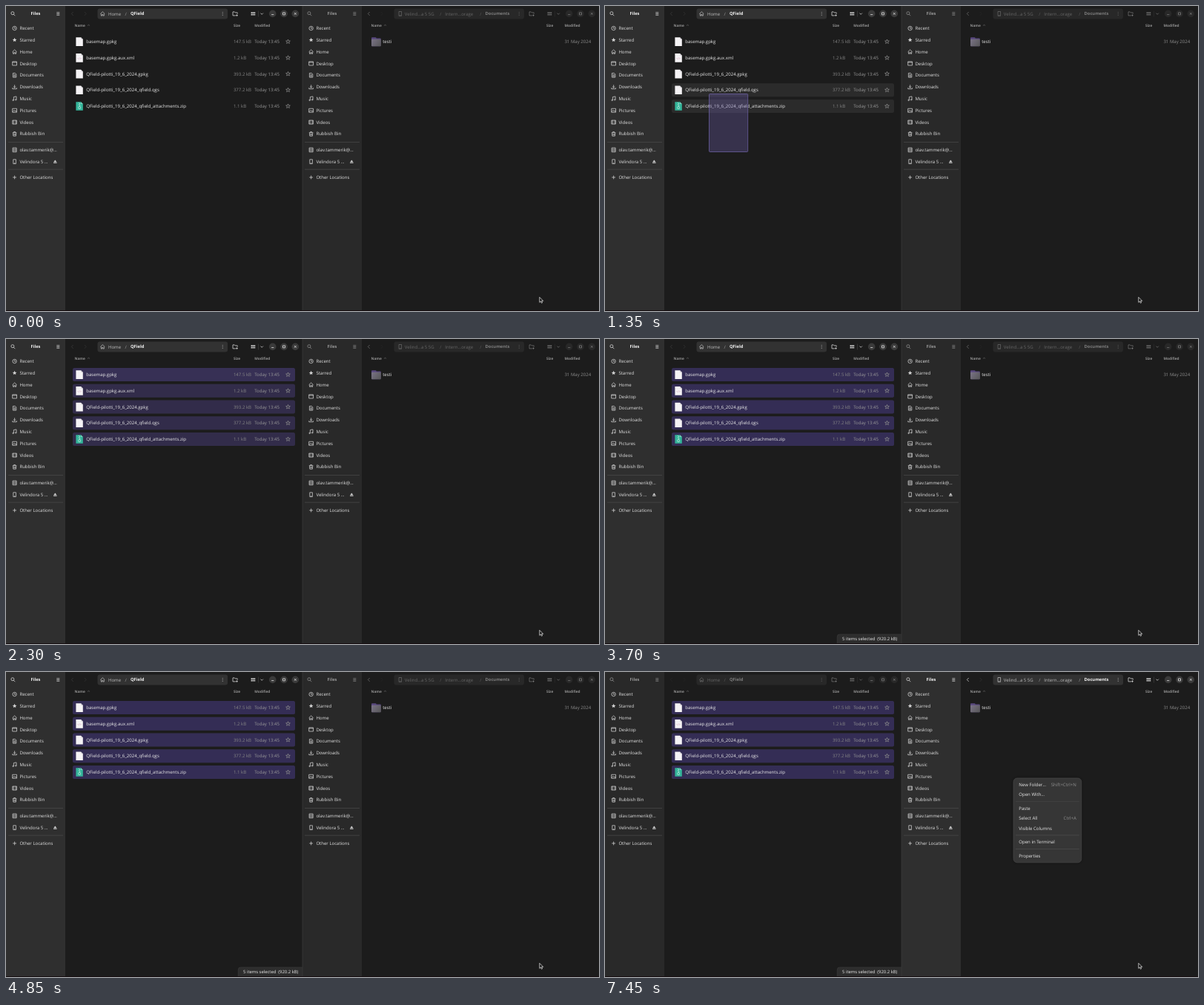
These frames come from a looping animation (800 by 411 pixels, 8 s). An HTML page with a canvas:

```html
<!DOCTYPE html>
<html lang="en">
<head>
<meta charset="utf-8">
<title>File manager: copy files to phone</title>
<style>
html, body { margin: 0; width: 100%; height: 100%; overflow: hidden; background: #1c1c1c; }
canvas { display: block; width: 800px; height: 411px; }
</style>
</head>
<body>
<canvas id="stage"></canvas>
<script>
const LOOP = 8000, STEP = 50, W = 800, H = 411;
const canvas = document.getElementById('stage');
const ctx = canvas.getContext('2d');
const dpr = window.devicePixelRatio || 1;
canvas.width = W * dpr;
canvas.height = H * dpr;

const ICONS = {
  search: 'M1.4-.6a2 2 0 1 1-4 0a2 2 0 1 1 4 0M.8.9L2.8 2.9',
  menu: 'M-2-1.8H2M-2 0H2M-2 1.8H2',
  clock: 'M2.7 0a2.7 2.7 0 1 1-5.4 0a2.7 2.7 0 1 1 5.4 0M0-1.7V.2H1.5',
  star: 'M0-3L.8-.95L2.9-.9L1.25.4L1.8 2.5L0 1.3L-1.8 2.5L-1.25.4L-2.9-.9L-.8-.95Z',
  home: 'M-3 .2L0-2.7L3 .2M-2 0V2.7H-.6V1H.6V2.7H2V0',
  desktop: 'M-2.9-2.5H2.9V2.5H-2.9ZM-2.9-1.5H2.9',
  document: 'M-2.2-2.8H.8L2.2-1.4V2.8H-2.2ZM-1.1-.6H1.1M-1.1.6H1.1M-1.1 1.7H1.1',
  download: 'M0-2.8V1M-1.7-.6L0 1.1L1.7-.6M-2.8 1V2.6H2.8V1',
  music: 'M-1.2 2V-2.4L2.4-3V1.3M-1.2 2a.8.7 0 1 1-1.6 0a.8.7 0 1 1 1.6 0M2.4 1.4a.8.7 0 1 1-1.6 0a.8.7 0 1 1 1.6 0',
  picture: 'M-2.9-2.5H2.9V2.5H-2.9ZM-2.6 1.9L-.8-.3L.4 1L1.4.2L2.7 1.8',
  video: 'M-2.8-2.5H2.8V2.5H-2.8ZM-1.5-2.5V2.5M1.5-2.5V2.5',
  bin: 'M-2.8-1.7H2.8M-1-1.8V-2.8H1V-1.8M-2.1-1.2L-1.8 2.8H1.8L2.1-1.2M-.6-.4V1.8M.6-.4V1.8',
  disk: 'M-2.5-2.8H2.5V2.8H-2.5ZM-2.5-.9H2.5M-2.5 1H2.5',
  phone: 'M-1.8-2.9H1.8V2.9H-1.8ZM-.6 2H.6',
  plus: 'M-2.4 0H2.4M0-2.4V2.4',
  eject: 'M0-2.2L2.3.7H-2.3ZM-2.3 1.5H2.3V2.2H-2.3Z',
  back: 'M1.2-2.4L-1.2 0L1.2 2.4',
  forward: 'M-1.2-2.4L1.2 0L-1.2 2.4',
  down: 'M-1.7-.8L0 .9L1.7-.8',
  folder: 'M-3.2 2.5V-2.5H-.9L0-1.5H3V.2M-3.2 2.5H.8M2.3.9V3.5M1 2.2H3.6',
  grid: 'M-2.6-2.2H-1V-.5H-2.6ZM-.6-2.2H1V-.5H-.6ZM1.4-2.2H3V-.5H1.4ZM-2.6.4H-1V2.1H-2.6ZM-.6.4H1V2.1H-.6ZM1.4.4H3V2.1H1.4Z',
  minimise: 'M-1.6 1.2H1.6',
  maximise: 'M-1.5-1.5H1.5V1.5H-1.5Z',
  close: 'M-1.4-1.4L1.4 1.4M1.4-1.4L-1.4 1.4',
  dots: 'M-.4-2.4H.4V-1.6H-.4ZM-.4-.4H.4V.4H-.4ZM-.4 1.6H.4V2.4H-.4Z',
  sort: 'M-1.5.5L0-.7L1.5.5',
  pointer: 'M0 0V7L1.6 5.5L2.7 7.9L3.8 7.3L2.8 5H4.9Z'
};
for (const name in ICONS) ICONS[name] = new Path2D(ICONS[name]);

const PLACES = [
  ['clock', 'Recent'], ['star', 'Starred'], ['home', 'Home'], ['desktop', 'Desktop'],
  ['document', 'Documents'], ['download', 'Downloads'], ['music', 'Music'],
  ['picture', 'Pictures'], ['video', 'Videos'], ['bin', 'Rubbish Bin']
];
const FILES = [
  ['basemap.gpkg', '147.5 kB'],
  ['basemap.gpkg.aux.xml', '1.2 kB', 'xml'],
  ['QField-pilotti_19_6_2024.gpkg', '393.2 kB'],
  ['QField-pilotti_19_6_2024_qfield.qgs', '377.2 kB'],
  ['QField-pilotti_19_6_2024_qfield_attachments.zip', '1.1 kB', 'zip']
];
// Each menu row: label, shortcut; null is a separator.
const FILE_MENU = [
  ['New Folder with Selection (5 Items)'], null,
  ['Open', 'Return'], ['Open With…'], null,
  ['Cut', 'Ctrl+X'], ['Copy', 'Ctrl+C'], ['Move to…'], ['Copy to…'], null,
  ['Rename…', 'F2'], ['Compress…'], ['E-mail…'], ['Move to the Rubbish Bin', 'Delete'], null,
  ['Properties', 'Alt+Return']
];
const FOLDER_MENU = [
  ['New Folder…', 'Shift+Ctrl+N'], ['Open With…'], null,
  ['Paste'], ['Select All', 'Ctrl+A'], ['Visible Columns'], null,
  ['Open in Terminal'], null, ['Properties']
];

const clamp = v => Math.max(0, Math.min(1, v));
const ramp = (t, a, b) => clamp((t - a) / (b - a));
const easeOut = p => 1 - (1 - p) ** 2;
const lerp = (a, b, p) => a + (b - a) * p;
const grey = v => `rgb(${v},${v},${v})`;
const rowY = i => 48 + i * 21.74;

function rect(x, y, w, h, fill, r = 0, stroke) {
  ctx.beginPath();
  ctx.roundRect(x, y, w, h, r);
  if (fill) { ctx.fillStyle = fill; ctx.fill(); }
  if (stroke) { ctx.strokeStyle = stroke; ctx.lineWidth = 0.7; ctx.stroke(); }
}

function text(str, x, y, color = '#e8e8e8', { size = 6.05, bold = false, align = 'left' } = {}) {
  ctx.font = `${bold ? 'bold ' : ''}${size}px "Open Sans", "Noto Sans", sans-serif`;
  ctx.textAlign = align;
  ctx.fillStyle = color;
  ctx.fillText(str, x, y + size * 0.35);
}

function icon(name, x, y, color = '#dedede', filled = false) {
  ctx.save();
  ctx.translate(x, y);
  ctx.lineWidth = 0.75;
  ctx.strokeStyle = ctx.fillStyle = color;
  filled ? ctx.fill(ICONS[name]) : ctx.stroke(ICONS[name]);
  ctx.restore();
}

function withAlpha(a, draw) {
  if (a <= 0) return;
  ctx.save();
  ctx.globalAlpha *= a;
  draw();
  ctx.restore();
}

function sidebar(x, focus) {
  rect(x, 0, 80, H, grey(Math.round(lerp(41, 47, focus))));
  withAlpha(lerp(0.55, 1, focus), () => {
    icon('search', x + 9.5, 10.3);
    text('Files', x + 40, 10.3, '#f2f2f2', { size: 5.7, bold: true, align: 'center' });
    icon('menu', x + 70.3, 10.5);
  });
  const entry = (name, label, y) => {
    icon(name, x + 11.6, y, '#d4d4d4', name === 'star');
    text(label, x + 18.4, y, '#e2e2e2');
  };
  PLACES.forEach(([name, label], i) => entry(name, label, 30 + i * 15.82));
  rect(x + 3, 183, 74, 0.7, '#484848');
  entry('disk', 'olav.tammerik@…', 193.9);
  entry('phone', 'Velindora 5 …', 209.7);
  icon('eject', x + 66.3, 209.7, '#d4d4d4', true);
  rect(x + 3, 219.8, 74, 0.7, '#484848');
  entry('plus', 'Other Locations', 230.9);
}

function header(x, focus, canGoBack, drawPath) {
  const y = 10.4;
  rect(x + 123.5, 3.4, 175.5, 14, grey(Math.round(lerp(40, 50, focus))), 3);
  withAlpha(lerp(0.42, 1, focus), () => {
    icon('back', x + 89.5, y, canGoBack ? '#d8d8d8' : '#3c3c3c');
    icon('forward', x + 107, y, '#343434');
    drawPath(y);
    icon('dots', x + 292.2, y, '#d8d8d8', true);
    icon('folder', x + 309.2, y);
    icon('grid', x + 333.2, y, '#d8d8d8', true);
    rect(x + 340.2, y - 4, 0.6, 8, '#454545');
    icon('down', x + 345.2, y);
    ['minimise', 'maximise', 'close'].forEach((name, i) => {
      const cx = x + 359.7 + i * 15.3;
      rect(cx - 4.8, y - 4.8, 9.6, 9.6, '#3a3a3a', 4.8);
      icon(name, cx, y, '#eee');
    });
  });
}

function columns(nameX, sizeX, dateX) {
  const caption = { size: 4.8, bold: true };
  text('Name', nameX, 26, '#929292', caption);
  icon('sort', nameX + 19, 26, '#666');
  text('Size', sizeX, 26, '#929292', caption);
  text('Modified', dateX, 26, '#929292', caption);
}

function localPath(y) {
  icon('home', 130.3, y, '#bdbdbd');
  text('Home', 138, y, '#bdbdbd');
  text('/', 160.6, y, '#a0a0a0');
  text('QField', 168, y, '#f4f4f4', { size: 5.8, bold: true });
}

function phonePath(y) {
  icon('phone', 531.8, y, '#bdbdbd');
  text('Velind…a 5 5G', 537.8, y, '#bdbdbd');
  text('/', 585.2, y, '#a0a0a0');
  text('Intern…orage', 592.3, y, '#bdbdbd');
  text('/', 639.2, y, '#a0a0a0');
  text('Documents', 646.5, y, '#f4f4f4', { size: 5.8, bold: true });
}

function fileIcon(kind, y) {
  const x = 94.4, top = y - 5.8, w = 9.4, h = 11.7, fold = 2.8;
  ctx.beginPath();
  ctx.moveTo(x, top);
  ctx.lineTo(x + w - fold, top);
  ctx.lineTo(x + w, top + fold);
  ctx.lineTo(x + w, top + h);
  ctx.lineTo(x, top + h);
  ctx.closePath();
  ctx.fillStyle = kind === 'zip' ? '#34b59a' : '#f5f3f5';
  ctx.fill();
  ctx.beginPath();
  ctx.moveTo(x + w - fold, top);
  ctx.lineTo(x + w, top + fold);
  ctx.lineTo(x + w - fold, top + fold);
  ctx.fillStyle = kind === 'zip' ? '#7ed0bd' : '#d8d4d9';
  ctx.fill();
  if (kind === 'xml') text('</>', x + 4.7, y + 1, '#c58cae', { size: 3.8, align: 'center' });
  if (kind === 'zip') {
    for (let i = 0; i < 4; i++) rect(x + 3.6 + (i % 2) * 1.1, top + 1 + i * 1.2, 1.1, 0.9, '#d9f3ec');
    rect(x + 3.4, y + 0.6, 2.6, 3, null, 0.8, '#d9f3ec');
  }
}

// Top-left corner of the selection band; its other corner is fixed.
function bandCorner(t) {
  const path = [[950, 190, 193], [1350, 140.5, 118.5], [1750, 113, 62], [1800, 110, 56], [2050, 103, 44]];
  let i = 0;
  while (i < path.length - 2 && t > path[i + 1][0]) i++;
  const [ta, xa, ya] = path[i], [tb, xb, yb] = path[i + 1];
  const p = ramp(t, ta, tb);
  return [lerp(xa, xb, p), lerp(ya, yb, p)];
}

function files(t) {
  const [bx, by] = bandCorner(t);
  const banding = t >= 950 && t < 2200;
  const selected = easeOut(ramp(t, 2200, 2400));
  const hover = t < 2200 ? 0 : 1 - ramp(t, 2400, 2500);
  FILES.forEach(([name, size, kind], i) => {
    const y = rowY(i), box = [90, y - 8.9, 300, 17.9];
    if (banding && by < y + 9 || t >= 2200) rect(...box, '#2b2b2b', 2.5);
    withAlpha(selected, () => rect(...box, '#342d55', 2.5));
    if (i === 0) withAlpha(hover, () => rect(...box, 'rgba(90,74,165,.12)', 2.5));
    fileIcon(kind, y);
    text(name, 108.2, y);
    text(size, 306.9, y, '#858585');
    text('Today 13:45', 335.2, y, '#999');
    icon('star', 380.5, y, '#8c8c8c');
  });
  if (banding) rect(bx, by, 192.7 - bx, 196.5 - by, 'rgba(112,98,176,.32)', 1, '#7468b0');
}

function phoneFolder() {
  const y = 48.2;
  rect(493, y - 6, 6.5, 4, '#59487f', 1);
  const g = ctx.createLinearGradient(493, y - 4, 506, y + 6);
  g.addColorStop(0, '#7b7488');
  g.addColorStop(1, '#565656');
  rect(493, y - 4.6, 12.8, 10.6, '#59487f', 1);
  rect(493, y - 3.4, 12.8, 9.4, g, 1);
  text('testi', 508.2, y);
  text('31 May 2024', 753.4, y, '#8c8c8c');
}

function statusBar(alpha) {
  withAlpha(alpha, () => {
    rect(313.3, 398, 90, 16, '#2d2d2d', 3, '#3b3b3b');
    text('5 items selected  (920.2 kB)', 320, 404.4, '#ececec', { size: 5.9 });
  });
}

function menu(items, x, y, w, h, alpha, active) {
  withAlpha(alpha, () => {
    ctx.save();
    ctx.shadowColor = 'rgba(0,0,0,.45)';
    ctx.shadowBlur = 4;
    rect(x, y, w, h, '#363636', 5);
    ctx.restore();
    rect(x, y, w, h, null, 5, '#484848');
    let cy = y + 8.8;
    items.forEach((item, i) => {
      if (!item) {
        rect(x + 3, cy - 4.2, w - 6, 0.6, '#4b4b4b');
        cy += 5.45;
        return;
      }
      if (i === active) rect(x + 3, cy - 6.6, w - 6, 13.2, '#4d4d4d', 2.5);
      text(item[0], x + 7.3, cy);
      if (item[1]) text(item[1], x + w - 7, cy, '#8f8f8f', { align: 'right' });
      cy += 13.3;
    });
  });
}

function activeItem(t) {
  if (t < 4300) return -1;
  return t < 4350 ? 3 : t < 4450 ? 5 : 6;
}

function pointer() {
  ctx.save();
  ctx.translate(719.8, 392.4);
  ctx.fillStyle = '#111';
  ctx.strokeStyle = '#ddd';
  ctx.lineWidth = 0.8;
  ctx.fill(ICONS.pointer);
  ctx.stroke(ICONS.pointer);
  ctx.restore();
}

function draw(t) {
  const leftFocus = 1 - ramp(t, 6250, 6350);
  const rightFocus = t >= 6250 ? 1 : 0;
  ctx.setTransform(dpr, 0, 0, dpr, 0, 0);
  ctx.textRendering = 'geometricPrecision';
  rect(0, 0, W, H, '#1c1c1c');

  sidebar(0, leftFocus);
  header(0, leftFocus, false, localPath);
  columns(92.5, 306.9, 335.2);
  files(t);
  statusBar(ramp(t, 2550, 2750));

  rect(400, 0, 400, H, '#1c1c1c');
  sidebar(400, rightFocus);
  header(400, rightFocus, true, phonePath);
  columns(492.5, 729, 753.4);
  phoneFolder();
  rect(399.6, 0, 0.8, H, '#3a3a3a');
  rect(0, 410, W, 1, '#160d10');

  const fileMenu = t < 4700 ? ramp(t, 3850, 3950) : 1 - ramp(t, 4700, 4850);
  menu(FILE_MENU, 190.7, 117.2, 111.8, 185.6, fileMenu, activeItem(t));
  menu(FOLDER_MENU, 551, 143, 91.8, 113.8, t >= 7450 ? 1 : 0, -1);
  pointer();
}

const start = performance.now();
function tick() {
  const t = (performance.now() - start) % LOOP;
  draw(Math.floor(t / STEP) * STEP);
  requestAnimationFrame(tick);
}
tick();
</script>
</body>
</html>
```
